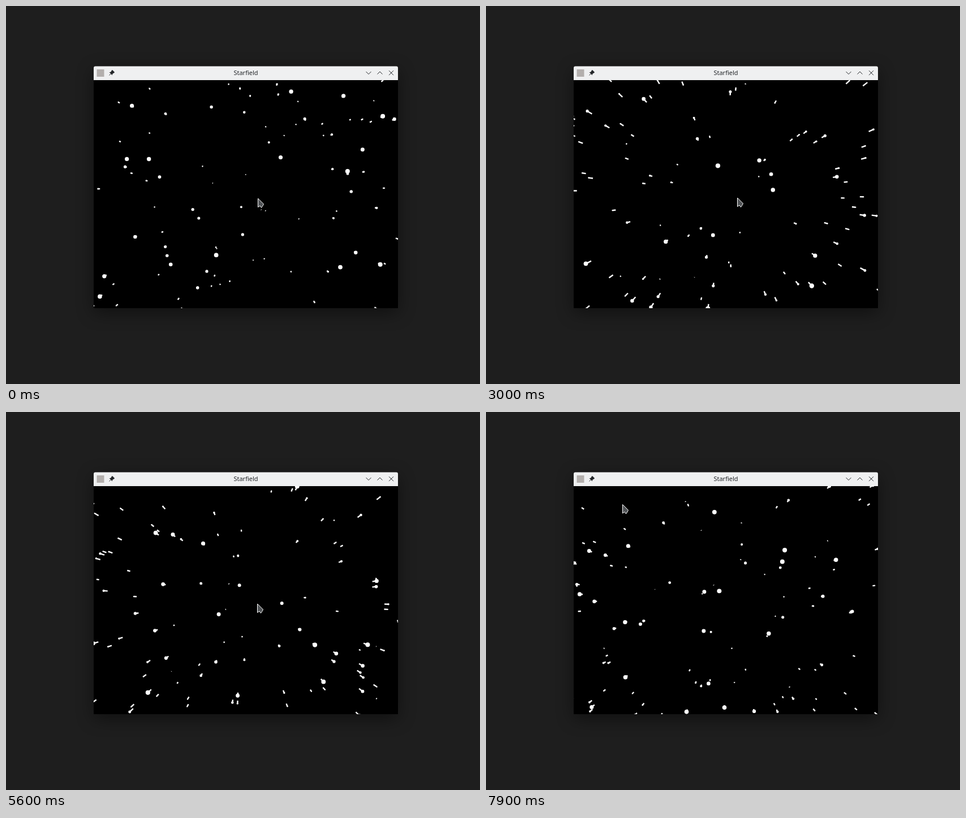
Animation of 838 by 668 pixels, one loop 8000 ms. Source, as an HTML page with a canvas:

```html
<!DOCTYPE html>
<html lang="en">
<head>
<meta charset="utf-8">
<title>Starfield</title>
<style>
html, body { margin: 0; width: 100%; height: 100%; overflow: hidden; background: #1e1e1e; }
#win {
  position: absolute; left: 155px; top: 106px; width: 538px; height: 428px;
  border-radius: 3px 3px 0 0;
  box-shadow: 0 8px 30px rgba(0, 0, 0, .45);
}
svg, canvas { position: absolute; left: 0; display: block; }
svg { top: 0; }
canvas { top: 25px; }
text { font: 11px "Noto Sans", sans-serif; fill: #232629; }
</style>
</head>
<body>
<div id="win">
  <svg width="538" height="25">
    <path d="M0 25V3.500Q0 .5 3 .5H535Q538 .5 538 3.500V25Z" fill="#eff0f1"/>
    <rect x="5.500" y="6" width="13" height="13" fill="#b3afad"/>
    <path d="M33 7L37 11 36 12.500 35 12.500 33 14.500V16.500L27.500 11H29.500L31.500 9V8Z" fill="#232629"/>
    <path d="M30.500 13.500L27.500 16.500" stroke="#232629"/>
    <text x="269" y="16" text-anchor="middle">Starfield</text>
    <path d="M481.500 10l4.500 4.500 4.500-4.500M501.500 14.500l4.500-4.500 4.500 4.500M522 8.200l8 8m0-8l-8 8"
      fill="none" stroke="#232629"/>
  </svg>
  <canvas width="538" height="403"></canvas>
</div>
<script>
const ctx = document.querySelector('canvas').getContext('2d');
const W = 538, H = 403, COUNT = 130, DEPTH = 0.3, MAX_R = 4.2;
const STEP = 100, STEPS = 80, TICKS = 6;

// Speed per tick at a few steps
const speeds = [[0, .012], [10, .011], [21, .03], [56, .025], [66, .036], [79, .016]];

function speedAt(n) {
  let i = 1;
  while (n > speeds[i][0]) i++;
  const [a, u] = speeds[i - 1], [b, v] = speeds[i];
  return u + (v - u) * (n - a) / (b - a);
}

function random(a, b, c) {
  let h = Math.imul(a + 1, 374761393) ^ Math.imul(b + 7, 668265263) ^ Math.imul(c + 3, 2246822519);
  h = Math.imul(h ^ h >>> 15, 2246822507);
  h = Math.imul(h ^ h >>> 13, 3266489909);
  return ((h ^ h >>> 16) >>> 0) / 4294967296;
}

const travel = [0];
for (let n = 1; n < STEPS; n++)
  travel[n] = travel[n - 1] + TICKS * speedAt(n) / DEPTH;

// Each star flies from z = 1 to z = 1 - DEPTH, then respawns elsewhere
function drawStar(i, n) {
  const life = random(i, 0, 3) + travel[n], cycle = Math.floor(life), age = life - cycle;
  const z = 1 - DEPTH * age, back = Math.min(1, z + speedAt(n));
  const u = random(i, cycle, 1) * 2 - 1, v = random(i, cycle, 2) * 2 - 1;
  // thin the centre out slightly
  const push = Math.max(Math.abs(u), Math.abs(v), .01) ** -.12;
  const x = u * push * W / 2, y = v * push * H / 2;
  ctx.beginPath();
  ctx.moveTo(x / back, y / back);
  ctx.lineTo(x / z, y / z);
  ctx.stroke();
  ctx.beginPath();
  ctx.arc(x / z, y / z, Math.max(.5, MAX_R * age), 0, 7);
  ctx.fill();
}

const arrow = new Path2D('M0 0V15.500L3.500 13 6 16.500 8.200 13.500 10 10Z');

function drawCursor(n) {
  const nudge = n < 26 ? 0 : 1;
  const k = Math.min(1, Math.max(0, (n - 73) / 6)), ease = k * k * (3 - 2 * k);
  ctx.save();
  ctx.translate(290.5 - nudge - 203 * ease, 209 - nudge - 175.5 * ease);
  ctx.fillStyle = '#515457';
  ctx.lineWidth = 1;
  ctx.fill(arrow);
  ctx.stroke(arrow);
  ctx.restore();
}

function draw(ms) {
  let n = Math.floor(ms / STEP) % STEPS;
  if (n === 25) n = 24; // one held step
  ctx.fillStyle = '#000';
  ctx.fillRect(0, 0, W, H);
  ctx.fillStyle = ctx.strokeStyle = '#fff';
  ctx.lineWidth = 2.4;
  ctx.save();
  ctx.translate(W / 2, H / 2);
  for (let i = 0; i < COUNT; i++) drawStar(i, n);
  ctx.restore();
  drawCursor(n);
}

const t0 = performance.now();
(function frame() {
  draw(performance.now() - t0);
  requestAnimationFrame(frame);
})();
</script>
</body>
</html>
```
